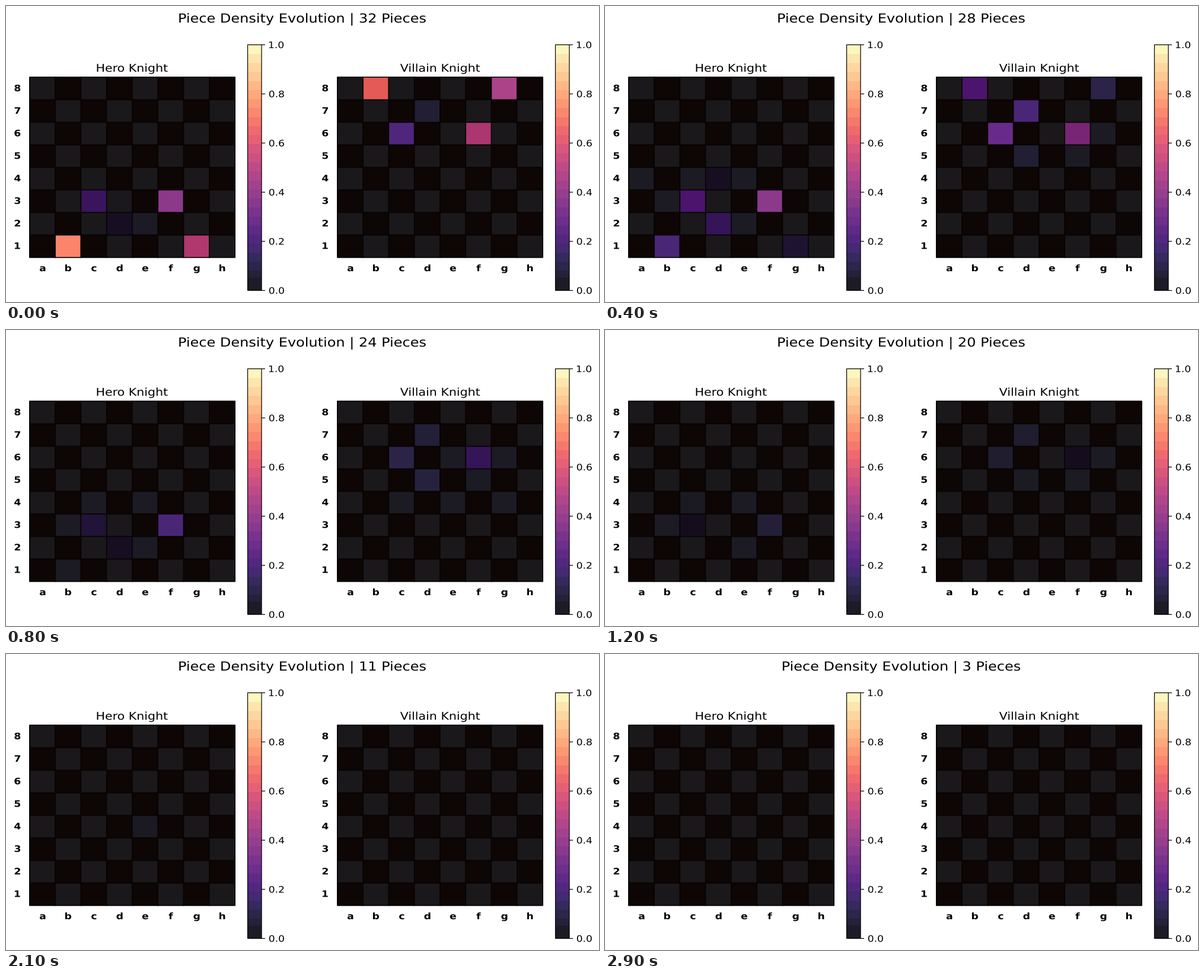
Recreate the animation shown at these times as a matplotlib script. Size 1000 by 500 pixels, loop 3 s.

```python
import matplotlib.pyplot as plt
import numpy as np
from matplotlib.animation import FuncAnimation
from matplotlib.patches import PathPatch, Rectangle
from matplotlib.textpath import TextPath
from matplotlib.transforms import Affine2D

WIDTH, HEIGHT, DPI = 1000, 500, 100
FRAMES, INTERVAL = 30, 100
PT_X, PT_Y = 1.714, 1.506          # pixels per point: the page is anamorphic
BOARD_TOP, BOARD_BOTTOM = 120.3, 424.7
CELL_W, CELL_H = 346.3 / 8, (BOARD_BOTTOM - BOARD_TOP) / 8
BAR_TOP, BAR_BOTTOM, BAR_W = 65.5, 480.5, 23.5
ALPHA = 0.9
MAGMA = plt.get_cmap("magma")
LIGHT = np.array([255, 240, 232]) / 255
DARK = np.array([125, 62, 12]) / 255
WHITE = np.ones(3)

# Square densities at key frames; squares left out are empty.
HERO = {
    0: dict(b1=.72, g1=.50, f3=.37, c3=.18, d2=.07, e2=.03),
    4: dict(b1=.185, g1=.10, f3=.37, c3=.23, d2=.17, e2=.025, b3=.025,
            a4=.025, c4=.025, d4=.07, e4=.025),
    8: dict(b1=.025, f3=.19, c3=.11, d2=.07, e2=.025, b3=.025, c4=.025,
            e4=.025),
    12: dict(f3=.065, c3=.06, e2=.025, b3=.025, c4=.02, e4=.025),
    15: dict(f3=.045, c4=.02),
    21: dict(e4=.02),
    24: {},
}
VILLAIN = {
    0: dict(b8=.66, g8=.45, f6=.49, c6=.20, d7=.06),
    4: dict(b8=.23, g8=.10, f6=.35, c6=.27, d7=.19, g6=.025, d5=.06, f5=.025),
    8: dict(f6=.17, c6=.10, d7=.065, e6=.025, g6=.025, d5=.08, f5=.025,
            c4=.025, e4=.025, g4=.025),
    12: dict(f6=.06, c6=.05, d7=.05, g6=.025, d5=.025, f5=.025),
    15: dict(c6=.025, d7=.025, d5=.025, f5=.025),
    21: {},
}

fig = plt.figure(figsize=(WIDTH / DPI, HEIGHT / DPI), dpi=DPI, facecolor="white")
ax = fig.add_axes([0, 0, 1, 1])
ax.set_xlim(0, WIDTH)
ax.set_ylim(HEIGHT, 0)
ax.axis("off")


def px(width):
    return width * 72 / DPI


def blend(value, base):
    return ALPHA * np.array(MAGMA(float(value))[:3]) + (1 - ALPHA) * base


def text_path(text, x, baseline, points, weight="normal", align=0.5):
    prop = dict(family="DejaVu Sans", weight=weight)
    path = TextPath((0, 0), text, size=points, prop=prop)
    box = path.get_extents()
    anchor = box.x0 + align * box.width
    place = Affine2D().translate(-anchor, 0).scale(PT_X, -PT_Y)
    return path.transformed(place.translate(x, baseline))


def write(*args, **kwargs):
    patch = PathPatch(text_path(*args, **kwargs), fc="black", lw=0, zorder=5)
    return ax.add_patch(patch)


def box(x, y, w, h, **style):
    return ax.add_patch(Rectangle((x, y), w, h, **style))


def outline(x, y, w, h):
    box(x, y, w, h, fc="none", ec="black", lw=px(1.2), snap=False, zorder=4)


def draw_colorbar(x):
    span = BAR_BOTTOM - BAR_TOP
    edges = np.concatenate([[0, 0.053], np.linspace(0.08, 1, 26)])
    for low, high in zip(edges[:-1], edges[1:]):
        box(x, BAR_BOTTOM - high * span, BAR_W, (high - low) * span,
            fc=blend((low + high) / 2, WHITE), lw=0, antialiased=False)
    outline(x, BAR_TOP, BAR_W, span)
    right = x + BAR_W
    for value in np.linspace(0, 1, 6):
        y = BAR_BOTTOM - value * span
        ax.plot([right, right + 6], [y, y], color="black", lw=px(1.2),
                solid_capstyle="butt", snap=False)
        write(f"{value:.1f}", right + 12.8, y + 5.6, 10, align=0)


def draw_board(left, title):
    cells = {}
    for col, name in enumerate("abcdefgh"):
        x = left + col * CELL_W
        write(name, x + CELL_W / 2 + 0.2, 448, 10, weight="bold")
        for rank in range(1, 9):
            y = BOARD_BOTTOM - rank * CELL_H
            base = LIGHT if (col + rank) % 2 == 0 else DARK
            patch = box(x, y, CELL_W, CELL_H, ec="#060303", lw=px(1.5),
                        snap=False)
            cells[f"{name}{rank}"] = patch, base
    for rank in range(1, 9):
        y = BOARD_BOTTOM - (rank - 0.5) * CELL_H
        write(str(rank), left - 20.5, y + 4.7, 10, weight="bold")
    outline(left, BOARD_TOP, 8 * CELL_W, 8 * CELL_H)
    write(title, left + 4 * CELL_W + 0.1, 111, 12)
    draw_colorbar(left + 367.7)
    return cells


def density(keys, square, frame):
    return np.interp(frame, list(keys), [k.get(square, 0) for k in keys.values()])


def heading_path(count):
    return text_path(f"Piece Density Evolution | {count} Pieces", 500, 28, 14)


boards = [
    (draw_board(39.8, "Hero Knight"), HERO),
    (draw_board(558.8, "Villain Knight"), VILLAIN),
]
heading = ax.add_patch(PathPatch(heading_path(32), fc="black", lw=0))


def update(frame):
    heading.set_path(heading_path(32 - frame))
    for cells, keys in boards:
        for square, (patch, base) in cells.items():
            patch.set_facecolor(blend(density(keys, square, frame), base))
    return []


animation = FuncAnimation(fig, update, frames=FRAMES, interval=INTERVAL,
                          repeat=True, repeat_delay=0)
plt.show()
```
